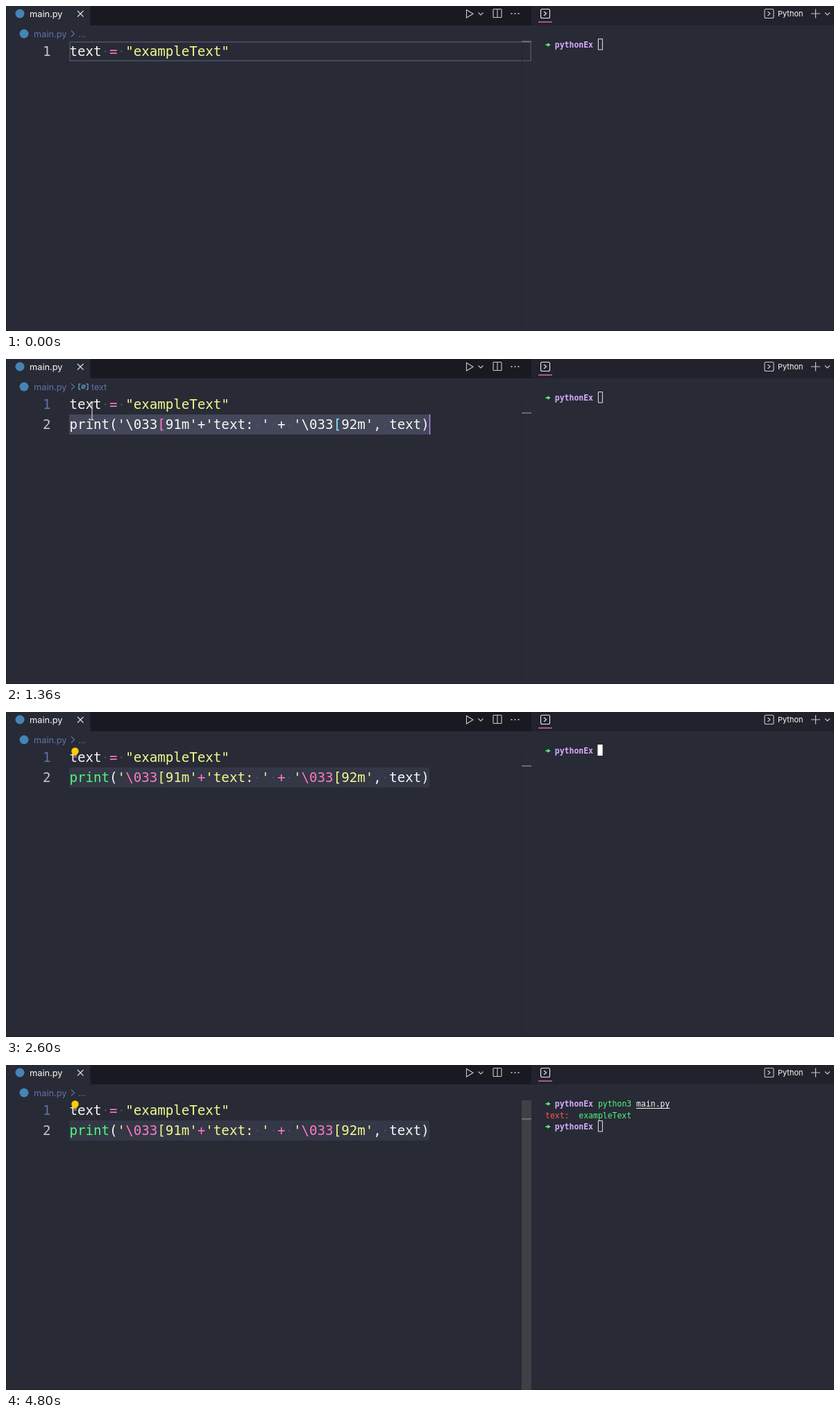
Write an HTML page with a canvas that moves like this. It is 1193x469 px and loops after 4840 ms.

```html
<!DOCTYPE html>
<html lang="en">
<head>
<meta charset="utf-8">
<title>Editor and terminal</title>
<style>
html, body { margin: 0; width: 100%; height: 100%; overflow: hidden; background: #282a36; }
canvas { display: block; }
</style>
</head>
<body>
<canvas width="1193" height="469"></canvas>
<script>
const ctx = document.querySelector('canvas').getContext('2d');
const LOOP = 4840;
const C = { bg: '#282a36', fg: '#f8f8f2', pink: '#ff79c6', green: '#50fa7b', yellow: '#f1fa8c',
  cyan: '#8be9fd', purple: '#d6acff', red: '#ff5555', muted: '#6272a4', icon: '#c8c8cc', select: '#44475a' };
const UI = 'Inter, sans-serif', MONO = '"DejaVu Sans Mono", monospace';
const CODE = { x: 91.5, advance: 11.52, font: `19.14px ${MONO}` };
const TERM = { x: 777, advance: 6.9, font: `11.46px ${MONO}` };

function rect(x, y, w, h, color, radius = 0) {
  ctx.fillStyle = color;
  ctx.beginPath();
  ctx.roundRect(x, y, w, h, radius);
  ctx.fill();
}

function outline(x, y, w, h, color, width = 1, radius = 0) {
  ctx.strokeStyle = color;
  ctx.lineWidth = width;
  ctx.beginPath();
  ctx.roundRect(x, y, w, h, radius);
  ctx.stroke();
}

function stroke(path, color = C.icon, width = 1.1) {
  ctx.strokeStyle = color;
  ctx.lineWidth = width;
  ctx.stroke(new Path2D(path));
}

function dot(x, y, r, color) {
  ctx.fillStyle = color;
  ctx.beginPath();
  ctx.arc(x, y, r, 0, 7);
  ctx.fill();
}

function text(str, x, y, font, color) {
  ctx.font = font;
  ctx.fillStyle = color;
  ctx.fillText(str, x, y);
}

// Draws coloured pieces one after another on a fixed character grid.
function runs(grid, y, pieces, spaceDots) {
  let col = 0;
  for (const [str, color] of pieces) {
    text(str, grid.x + col * grid.advance, y, grid.font, color);
    for (const ch of str) {
      if (spaceDots && ch === ' ') dot(grid.x + (col + .5) * grid.advance, y - 6.5, 1.2, '#51535f');
      col++;
    }
  }
}

function promptIcon(x, y, color) {
  outline(x, y, 13, 13, color, 1.1, 2);
  stroke(`M${x + 4.5} ${y + 3.5}l3.5 3l-3.5 3`, color);
}

function drawFrame() {
  rect(0, 0, 1193, 469, C.bg);
  rect(121.5, 0, 635.5, 28, '#191a21');
  rect(757, 0, 436, 28, '#21222c');
  rect(0, 0, 1, 469, '#1e2029');
  rect(0, 468, 1193, 1, '#1e2029');

  dot(20, 11, 6.5, '#4584b6');
  text('main.py', 34, 15.5, `12.8px ${UI}`, C.fg);
  stroke('M103 7l8.5 8.5M111.5 7l-8.5 8.5', '#e0e0e0');

  stroke('M663.5 5.5v11.5l9.5-5.75z');
  stroke('M680.5 9.5l3.5 3.5l3.5-3.5');
  outline(702, 4.5, 12, 12, C.icon, 1.1, 1);
  stroke('M708 4.5v12');
  for (const x of [728.5, 733.5, 738.5]) dot(x, 11, 1.1, C.icon);

  promptIcon(770.5, 4.5, '#e8e8ea');
  rect(767, 22.5, 20, 1.2, C.pink);
  promptIcon(1093, 4.5, C.icon);
  text('Python', 1112, 15, `11px ${UI}`, C.fg);
  stroke('M1160 11h13M1166.5 4.5v13', C.icon, 1.2);
  stroke('M1180 9.5l3.5 3.5l3.5-3.5');
}

function drawBreadcrumb(symbol) {
  dot(26, 40, 6.5, '#4584b6');
  text('main.py', 40, 44.5, `12.8px ${UI}`, C.muted);
  stroke('M94 35.5l4.5 4.5l-4.5 4.5', C.muted);
  if (!symbol) return text('...', 104, 44.5, `12.8px ${UI}`, C.muted);
  stroke('M107.5 36h-2.5v8h2.5M115.5 36h2.5v8h-2.5M109 42.5l5-5', '#75beff', 1);
  outline(109, 37.8, 5, 4.5, '#75beff', 1, 2);
  text('text', 123, 44.5, `12.5px ${UI}`, C.muted);
}

function drawEditor(t) {
  const selected = t >= 680 && t < 1320, inserted = t >= 1320, colored = t >= 1400;
  const marked = t >= 840 && t < 1320;
  drawBreadcrumb(t >= 760 && t < 1480);

  if (t < 680) outline(92, 52, 664, 27, C.select, 2);
  if (selected) rect(91, 51, 47.5, 29, marked ? '#4a7c64' : C.select);
  if (marked) rect(264.5, 51, 46.5, 29, '#424450');
  if (inserted) rect(91, 80, 519, 29, t < 2120 ? C.select : '#343746', t < 2120 ? 0 : 3);

  text('1', 53, 72, CODE.font, inserted ? C.muted : '#c6c6c6');
  runs(CODE, 72, [['text ', C.fg], ['= ', C.pink], ['"exampleText"', C.yellow]], true);
  if (selected) rect(138, 51, 1.5, 29, '#d0d0d0');

  if (inserted) {
    const tint = color => colored ? color : C.fg;
    const str = tint(C.yellow), op = tint(C.pink);
    text('2', 53, 101.3, CODE.font, '#c6c6c6');
    runs(CODE, 101.3, [
      ['print', tint(C.green)], ['(', C.fg], ["'", str], ['\\033', op],
      ['[', colored ? str : C.pink], ["91m'", str], ['+', op], ["'text: '", str],
      [' ', C.fg], ['+', op], [' ', C.fg], ["'", str], ['\\033', op],
      ['[', colored ? str : C.cyan], ["92m'", str], [', text)', C.fg]
    ], true);
    if (t < 1880) rect(610, 80, 1.3, 29, '#bd93f9');
  }

  if (t >= 1640) {
    rect(97, 61, 5, 5, '#6b6c72', 1);
    dot(99.5, 56.5, 5.2, '#ffcc00');
    rect(97.3, 58, 4.4, 4.5, '#ffcc00');
  }
  if (t >= 640 && t < 760) drawPointer(57);
  if (t >= 1320 && t < 1520) drawPointer(62);
}

function drawPointer(y) {
  stroke(`M121.5 ${y}q2.5 0 2.5 2v22q0 2-2.5 2M126.5 ${y}q-2.5 0-2.5 2v22q0 2 2.5 2`, '#c4c4c8', 1.3);
}

function drawRuler(t) {
  rect(743, 51, 1, 418, '#242630');
  const fadeIn = Math.min(1, Math.max(0, (t - 1560) / 120));
  ctx.globalAlpha = t < 2600 ? fadeIn : t < 4360 ? 0 : t < 4440 ? .45 : .85;
  rect(743, 51, 14, 418, '#444549');
  ctx.globalAlpha = 1;
  if (t >= 1000 && t < 1320) rect(747, 52, 6, 28, C.green);
  rect(743, t < 1320 ? 50.5 : 77, 14, 1.6, '#77787d');
}

function drawPrompt(y) {
  stroke(`M777.5 ${y - 4}h4`, C.green, 1.8);
  ctx.fillStyle = C.green;
  ctx.fill(new Path2D(`M780.5 ${y - 7}l4 3l-4 3z`));
  text('pythonEx', TERM.x + 2 * TERM.advance, y, `bold ${TERM.font}`, C.purple);
}

function drawCursor(col, row, filled) {
  const x = TERM.x + col * TERM.advance, y = 47 + row * 16.5;
  if (filled) rect(x - .5, y, 7.2, 16, '#ffffff');
  else outline(x + .5, y + .5, 6, 15.5, '#e8e8e8');
}

function drawTerminal(t) {
  drawPrompt(60);
  const line = y => 60 + y * 16.5;
  if (t >= 3320) {
    runs(TERM, line(0), [[' '.repeat(11), C.fg], ['python3 ', C.green], ['main.py', C.fg]]);
    rect(TERM.x + 19 * TERM.advance, 62, 7 * TERM.advance, 1, C.fg);
  } else if (t >= 2960) {
    runs(TERM, line(0), [[' '.repeat(11), C.fg], ['pytho', C.red]]);
  }
  if (t >= 3720) runs(TERM, line(1), [['text:  ', C.red], ['exampleText', C.green]]);
  if (t >= 3760) drawPrompt(line(2));

  const [col, row] = t < 2960 ? [11, 0] : t < 3320 ? [16, 0] : t < 3680 ? [26, 0]
    : t < 3720 ? [0, 1] : t < 3760 ? [0, 2] : [11, 2];
  drawCursor(col, row, t >= 2120 && t < 4800);
}

function draw() {
  const t = performance.now() % LOOP;
  drawFrame();
  drawEditor(t);
  drawRuler(t);
  drawTerminal(t);
  requestAnimationFrame(draw);
}
draw();
</script>
</body>
</html>
```
